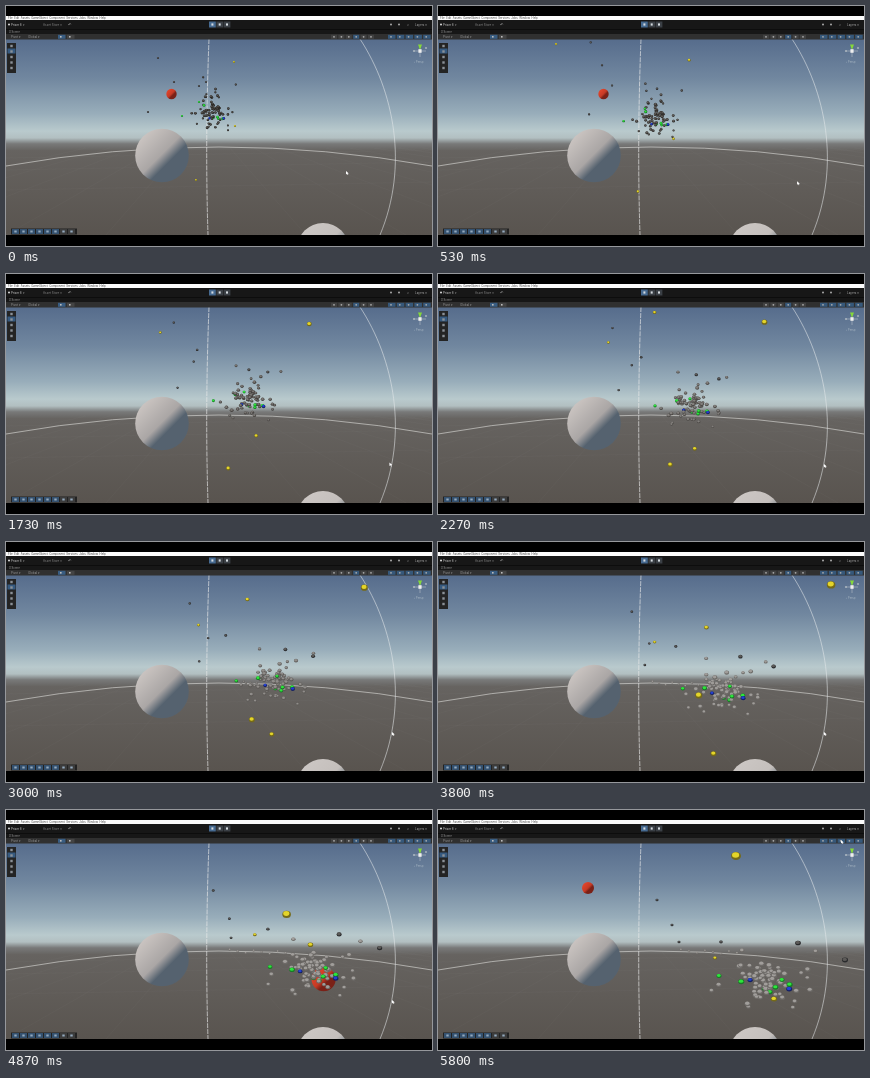
Animation of 426x240 px, one loop 5.87 s. Source, as an HTML page with a canvas:

```html
<!DOCTYPE html>
<html lang="en">
<head>
<meta charset="utf-8">
<title>Particle scene</title>
<style>
html, body { margin: 0; width: 100%; height: 100%; overflow: hidden; background: #000; }
canvas { display: block; width: 100vw; height: 100vh; }
</style>
</head>
<body>
<canvas id="stage" width="426" height="240"></canvas>
<script>
const ctx = document.getElementById('stage').getContext('2d');
const LOOP = 5870, STEP = 200 / 3;
const { PI, sin, cos, floor, min, max, sqrt, log } = Math;

let seed = 7;
const rand = () => (seed = (seed * 16807) % 2147483647) / 2147483647;
const lerp = (a, b, u) => a + (b - a) * u;
const clamp = u => max(0, min(1, u));
const ease = u => u * u * (3 - 2 * u);

function rect(x, y, w, h, fill) {
  ctx.fillStyle = fill;
  ctx.fillRect(x, y, w, h);
}

function oval(x, y, rx, ry, fill) {
  ctx.fillStyle = fill;
  ctx.beginPath();
  ctx.ellipse(x, y, rx, ry, 0, 0, 2 * PI);
  ctx.fill();
}

const disc = (x, y, r, fill) => oval(x, y, r, r, fill);

function label(text, x, y, fill = '#999', size = 3) {
  ctx.font = `${size}px Inter, sans-serif`;
  ctx.fillStyle = fill;
  ctx.fillText(text, x, y);
}

function stroke(path, color, width, dash = []) {
  ctx.strokeStyle = color;
  ctx.lineWidth = width;
  ctx.setLineDash(dash);
  ctx.stroke(new Path2D(path));
  ctx.setLineDash([]);
}

// Ball lit from the upper left, with a diagonal shadow edge.
function sphere(x, y, r, light, mid, dark) {
  const k = r * .7;
  const g = ctx.createLinearGradient(x - k, y - k, x + k, y + k);
  g.addColorStop(0, light);
  g.addColorStop(.48, mid);
  g.addColorStop(.68, dark);
  g.addColorStop(1, dark);
  disc(x, y, r, g);
}

const gray = v => `rgb(${v + 3},${v},${v - 3})`;
const paint = {
  dark: ['#5c5a58', '#292a2c'],
  yellow: ['#e4d52a', '#756a18'],
  green: ['#2ee53c', '#177b25'],
  blue: ['#2440d0', '#142064']
};

// Balls flatten slightly as they near the camera.
function ball(x, y, r, age, [top, under]) {
  const wide = 1 + .25 * age;
  oval(x, y, r * wide, r, under);
  oval(x - r * .1, y - r * .25, r * .72 * wide, r * .68, top);
}

// Stray balls cross from one point to another; lift bows the path upwards.
const strays = [];
const stray = (color, size, from, to, lift = 0) => strays.push({ color, size, from, to, lift });
stray('dark', 1.2, [146, 31], [219, 90]);
stray('dark', 1.4, [152, 52], [283, 132]);
stray('dark', 1.2, [168, 76], [234, 115]);
stray('dark', 1.2, [142, 106], [241, 132]);
stray('dark', 2.4, [200, 76], [407, 150]);
stray('dark', 2.3, [193, 80], [360, 133]);
stray('yellow', 1.6, [102, 30], [277, 148], 8);
stray('yellow', 2.5, [140, 20], [336, 189], 50);
stray('yellow', 4, [190, 174], [298, 46], -70);
stray('yellow', 3.2, [229, 120], [300, 260]);
stray('yellow', 5, [228, 56], [480, 36]);
stray('green', 2.1, [176, 110], [281, 166]);
stray('green', 2.1, [193, 96], [344, 170]);

const swarm = Array.from({ length: 86 }, (_, i) => ({
  reach: min(2.6, sqrt(-2 * log(rand()))),
  angle: rand() * 2 * PI,
  spin: (rand() - .35) * .5,
  size: .85 + rand() * .35,
  color: i % 20 === 3 ? 'green' : i === 40 || i === 70 ? 'blue' : ''
}));

function drawWorld() {
  const sky = ctx.createLinearGradient(0, 33, 0, 229);
  [[0, '#566c8c'], [.2, '#71879f'], [.38, '#98adba'], [.47, '#b9cacd'], [.505, '#b2bfc1'],
   [.535, '#787979'], [.57, '#666360'], [1, '#59544f']].forEach(s => sky.addColorStop(...s));
  rect(0, 33, 426, 196, sky);
  for (let i = -5; i < 10; i++)
    stroke(`M${200 + i * 24} 142L${200 + i * 100} 229`, 'rgba(160,160,160,.08)', .6);
  for (let i = 1; i < 4; i++)
    stroke(`M0 ${148 + i * i * 4}L426 ${140 + i * i * 4}`, 'rgba(160,160,160,.08)', .6);
  stroke('M0 160Q213 122 426 160', 'rgba(225,225,222,.75)', .8);
  stroke('M203 33Q199 135 202 229', 'rgba(235,235,235,.75)', .9, [5, 1]);
  stroke('M354 33C388 85 403 160 374 229', 'rgba(230,233,235,.7)', .8);
}

// The red ball slips behind the pale one, then sweeps back past the camera.
function drawRed(t, returning) {
  const u = (t - 4870) / 930;
  const color = ['#e2452c', '#c63a25', '#7a2117'];
  if (returning) sphere(317 - 167 * u, 169 - 91 * u, 12 - 6 * u, ...color);
  else if (t < 3000) sphere(165.5, 88 + 55 * ease(clamp((t - 1130) / 700)), 5.2, ...color);
}

function drawParticles(age) {
  const cx = lerp(207, 327, age), cy = lerp(106, 171, age);
  const sx = lerp(9, 20, age), sy = lerp(10, 13, age);
  const tone = floor(lerp(84, 158, clamp(age * 1.5)));
  const shade = [gray(tone), gray(tone - 52)];

  swarm.forEach((p, i) => {
    const a = p.angle + p.spin * age * 6;
    const loose = i % 6 === 0;
    const x = cx + cos(a) * p.reach * sx * (loose ? 1.4 : .95) - (loose ? 6 : 0);
    const y = cy + sin(a) * p.reach * sy * (loose ? 1.4 : .95) - (loose ? 10 * (1 - age) : 0);
    ball(x, y, p.size * lerp(1.2, 2.1, age), age, paint[p.color] || shade);
  });

  // A thin wake stretches out along the horizon.
  const wake = clamp((age - .45) * 4);
  if (wake) for (let i = 0; i < 8; i++)
    ball(cx - 12 - wake * (72 - i * 8), 139.5 + i % 3 * 1.4 + i * .3, 1, age, shade);

  for (const { color, size, from, to, lift } of strays) {
    const x = lerp(from[0], to[0], age);
    const y = lerp(from[1], to[1], age) - lift * 4 * age * (1 - age);
    ball(x, y, lerp(1.1, size, age), age, paint[color]);
  }
}

function drawBars() {
  rect(0, 0, 426, 10, '#000');
  rect(0, 229, 426, 11, '#000');
  rect(0, 10, 426, 4, '#fbfbfb');
  label('File  Edit  Assets  GameObject  Component  Services  Jobs  Window  Help', 2, 13.1, '#444', 2.8);
  rect(0, 14, 426, 14, '#171717');
  rect(0, 23, 426, .6, '#080808');
  rect(0, 28, 426, 5.5, '#303030');
  disc(3, 18.5, 1, '#ddd');
  label('Prism 6', 5, 19.6, '#ccc');
  label('▾', 17, 19.6);
  label('Asset Store ▾', 37, 19.6, '#888');
  label('↶', 62, 19.8, '#bbb', 4);
  label('# Scene', 3, 26.5, '#999', 2.8);

  for (let i = 0; i < 3; i++) {
    const x = 203 + i * 7.3;
    rect(x, 15.5, 6.8, 6, i ? '#3a3f45' : '#466a91');
    rect(x + 2.4, 17.4, 2, 2.2, '#d5dbe0');
  }
  for (let i = 0; i < 2; i++) disc(385 + i * 8, 18.5, 1, '#aaa');
  label('⌕', 401, 19.8, '#aaa', 4);
  label('Layers ▾', 409, 19.6, '#aaa');

  label('Pivot ▾', 5, 31.8);
  label('Global ▾', 22, 31.8);
  for (let i = 0; i < 2; i++) {
    rect(52 + i * 9, 28.8, 7.5, 4, i ? '#444' : '#395d82');
    rect(54 + i * 9, 30, 1.6, 1.6, '#bbb');
  }
  for (let i = 0; i < 11; i++) {
    const x = i < 6 ? 325 + i * 7.4 : 382 + (i - 6) * 8.8;
    rect(x, 28.8, i < 6 ? 6 : 7.5, 4, i === 3 || i > 5 ? '#36587a' : '#414141');
    disc(x + 3, 30.8, .9, '#aaa');
  }
}

function drawTools() {
  rect(1, 37, 9, 30, '#242424');
  rect(1.5, 42.5, 8, 5, '#365a80');
  for (let i = 0; i < 5; i++)
    rect(4.3, 38.8 + i * 5.5, 2.4, 2.4, '#8b9197');
  rect(5, 222.5, 66, 6, '#222');
  for (let i = 0; i < 8; i++) {
    rect(6 + i * 8, 223, 7, 5, i > 5 ? '#3c3c3c' : '#34516f');
    rect(8.3 + i * 8, 224.5, 2.4, 2, '#93a9be');
  }
  stroke('M408 45H420M414 45V51', 'rgba(205,210,215,.5)', .9);
  disc(408, 45, 1.1, '#a9b4be');
  disc(420, 42, 1.1, '#a2adb8');
  ctx.fillStyle = '#85d83a';
  ctx.fill(new Path2D('M412 38.500H416L414 44Z'));
  rect(412.4, 43.2, 3.2, 3.6, '#eee');
  label('‹ Persp', 408, 57, '#a9b7c3', 2.8);
}

function drawPointer(t) {
  const rest = 1 - clamp(t / 2270);
  const leave = ease(clamp((t - 5400) / 400));
  ctx.save();
  ctx.translate(lerp(386 - 46 * rest * rest, 403, leave), lerp(190 - 25 * rest * rest, 30, leave));
  ctx.fillStyle = '#fff';
  ctx.fill(new Path2D('M0 0V3.500L1 2.700L1.700 4L2.300 3.700L1.700 2.400H2.800Z'));
  ctx.restore();
}

function draw(t) {
  drawWorld();
  drawRed(t, false);
  sphere(156, 149.5, 26.8, '#c9c3c0', '#aaa6a5', '#55626f');
  sphere(317, 243, 26, '#cbc6c3', '#c4bfbc', '#7e868c');
  drawRed(t, true);
  drawParticles(t / 5800);
  drawTools();
  drawBars();
  drawPointer(t);
}

const start = performance.now();
function tick() {
  const t = (performance.now() - start) % LOOP;
  draw(min(5800, floor((t + 5) / STEP) * STEP));
  requestAnimationFrame(tick);
}
tick();
</script>
</body>
</html>
```
